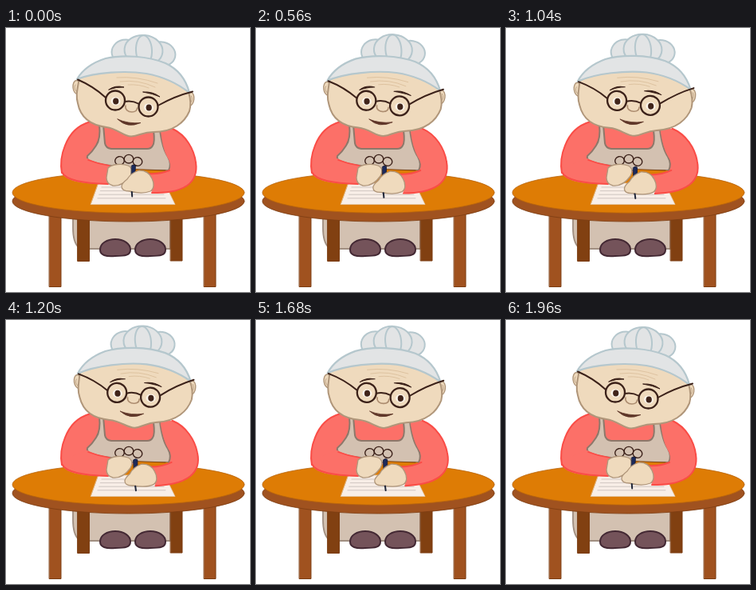
Write an HTML page with a canvas that moves like this. It is 306x330 px and loops after 2 s.

```html
<!DOCTYPE html>
<html lang="en">
<head>
<meta charset="utf-8">
<title>Grandmother writing</title>
<style>
html, body { margin: 0; width: 100%; height: 100%; overflow: hidden; background: #fff; }
canvas { display: block; width: 306px; height: 330px; }
</style>
</head>
<body>
<canvas id="stage"></canvas>
<script>
const canvas = document.getElementById('stage');
const ctx = canvas.getContext('2d');
const ratio = window.devicePixelRatio || 1;
canvas.width = 306 * ratio;
canvas.height = 330 * ratio;

const LOOP = 2000, STEP = 40, PEAK = 1440, REST = 1960;
const SKIN = '#efdabd', SKIN_EDGE = '#b0967a';
const HAIR = '#e2e4e5', HAIR_EDGE = '#b5c7cd';
const CORAL = '#fc7068', CORAL_EDGE = '#fa4c46';
const APRON = '#d3c1b1', APRON_EDGE = '#8d786a';
const WOOD = '#a0521f', WOOD_EDGE = '#7c3d12', WOOD_BACK = '#814011', TOP = '#de7c05';
const DARK = '#3b2119';

function paint(path, fill, stroke, width = 1) {
  if (fill) { ctx.fillStyle = fill; ctx.fill(path); }
  if (stroke) { ctx.strokeStyle = stroke; ctx.lineWidth = width; ctx.stroke(path); }
}

function shape(d, fill, stroke, width) {
  paint(new Path2D(d), fill, stroke, width);
}

function oval(x, y, rx, ry, turn, fill, stroke, width) {
  const path = new Path2D();
  path.ellipse(x, y, rx, ry, turn, 0, Math.PI * 2);
  paint(path, fill, stroke, width);
}

function turned(x, y, angle, draw) {
  ctx.save();
  ctx.translate(x, y);
  ctx.rotate(angle);
  ctx.translate(-x, -y);
  draw();
  ctx.restore();
}

function leg(x, y, bottom, fill) {
  shape(`M${x} ${y}H${x + 14.5}V${bottom}H${x}Z`, fill, WOOD_EDGE);
}

function shoe(x) {
  shape(`M${x} 277C${x} 269 ${x + 9} 264 ${x + 19} 264C${x + 30} 264 ${x + 38} 270 ${x + 38} 277C${x + 38} 284 ${x + 32} 285 ${x + 19} 285C${x + 7} 286 ${x} 284 ${x} 277Z`, '#74535a', '#432833', 2);
}

function lowerPart() {
  shape('M84 232V250Q84 268 91 274Q96 276 106 276H206V232Z', APRON, '#a08e80', 1.8);
  leg(90, 232, 291.5, WOOD_BACK);
  leg(206.5, 232, 291, WOOD_BACK);
  shoe(118);
  shoe(162);
}

function table() {
  leg(54.5, 222, 323.5, WOOD);
  leg(248.5, 222, 323.5, WOOD);
  oval(153.5, 216.5, 145.5, 25.5, 0, WOOD, WOOD_EDGE, 0.8);
  oval(153.5, 205.7, 145.5, 25.5, 0, TOP, '#b6640d', 0.8);
}

function body() {
  shape('M106 117C89 122 80 132 74 147C69 159 68 170 70 181C75 191 90 194 128 195L134 180H204L232 176C231 151 224 136 209 126Z', CORAL);
  shape('M106 117C89 122 80 132 74 147C69 159 68 170 70 181', null, CORAL_EDGE, 2);
  shape('M117 121Q119 138 113 147Q108 155 102 160Q101 164 105 166C111 169 121 171 131 172L145 178H204Q208 170 203 161Q196 151 193 127L185 128Q187 143 184 147Q182 151 177 151H132Q125 150 124 144L122 121Z', APRON, APRON_EDGE, 2);
  oval(142.5, 166, 5.8, 5.3, -0.2, null, DARK, 1.4);
  oval(165, 167, 5.8, 5.3, 0.2, null, DARK, 1.4);
  oval(154, 163.7, 5.8, 5.3, 0, APRON, DARK, 1.4);
  shape('M160 176.5L203 178V182H160Z', TOP);
  shape('M160 176.5L200 178', null, '#7e481a', 1);
}

function paper() {
  shape('M116 194H199L212 220.5H106.5Z', '#f8eee7', '#e3c8a8', 0.8);
  for (let i = 0; i < 4; i++) {
    const y = 199 + i * 4.6;
    shape(`M${120 - i * 1.7} ${y}H${194 + i * 2}`, null, '#c6bbb8', 0.8);
  }
}

function leftArm() {
  shape('M70 181C76 172 88 167 102 163Q116 170 131 172L128 195C100 195 77 193 70 181Z', CORAL);
  shape('M103 165Q116 170 130 172', null, CORAL_EDGE, 1.5);
  shape('M70 180C75 191 98 194 128 195', null, CORAL_EDGE, 2);
  shape('M128 175C133 170 146 169 153 172C159 175 159 180 156 185C151 192 143 198 134 197Q126 195 126 187Z', SKIN, SKIN_EDGE, 1.3);
}

function rightArm() {
  shape('M209 126C226 134 236 152 238 168C240 181 237 190 227 197C215 205 199 206 183 206L178 182Q193 183 205 178Q208 170 202 161Q196 150 194 128Z', CORAL);
  shape('M209 126C226 134 236 152 238 168C240 181 237 190 227 197C215 205 199 206 183 206M178 182Q193 183 205 178', null, CORAL_EDGE, 2);
  shape('M157.5 172Q160 170 162.5 172L160.5 205H157Z', '#1c2a5c', '#151a32', 0.8);
  shape('M145 198C145 195 148 192 152 189C155 184 160 180 167 178C174 178 180 181 183 188C186 194 186 201 181 204C174 207 163 206 155 204C149 204 145 202 145 198Z', SKIN, SKIN_EDGE, 1.3);
  shape('M157.8 205L158.2 210.5', null, '#202638', 2);
}

function hair() {
  oval(149.5, 29.5, 17, 15, -0.2, HAIR, HAIR_EDGE, 2);
  oval(195, 32.5, 17.5, 15, 0.2, HAIR, HAIR_EDGE, 2);
  oval(172.5, 28, 24, 19, 0.1, HAIR, HAIR_EDGE, 2);
  oval(173, 28, 10, 18.7, -0.05, null, HAIR_EDGE, 2);
  shape('M89 64C96 52 109 43 125 38C146 33 178 35 200 44C217 52 226 65 230 81C216 70 198 61 176 57C151 53 112 55 89 64Z', HAIR, HAIR_EDGE, 2.2);
}

function eye(x, y) {
  oval(x, y, 12, 12, 0, SKIN, DARK, 2.3);
  oval(x + 0.5, y + 1, 6, 5, 0.15, '#fbf5ec');
  oval(x + 0.7, y + 1, 3.6, 4, 0, '#40241a');
}

function head() {
  oval(89, 74, 5, 8.5, -0.1, SKIN, SKIN_EDGE, 1.4);
  oval(231, 89, 4.7, 8.5, 0.15, SKIN, SKIN_EDGE, 1.4);
  shape('M87 71Q84.5 75 88 79M232.5 85Q235 90 231 94', null, SKIN_EDGE, 0.8);
  shape('M92 62C90 75 87 84 90 94C93 110 103 121 126 124C140 126 147 135 157 135.5C167 135 171 130 185 130C210 130 224 118 230 104Q233 94 229 80C213 58 180 49 148 49C121 49 103 54 92 62Z', SKIN, SKIN_EDGE, 2);
  hair();
  shape('M139 62Q164 60 190 69M143 67Q166 64 187 74M153 71Q167 70 179 75', null, '#dcc09d', 0.9);
  shape('M129 77Q137 71 148 74Q138 73.5 129 77ZM172 80Q184 79 193 86Q184 82 172 80Z', DARK, DARK, 1);
  shape('M150 97C149 102 153 105 158 105Q164 105 164.5 100', null, '#ad8d70', 1.6);
  eye(137, 90.5);
  eye(178.5, 98.5);
  shape('M125 87Q110 73 90 64.5M190.5 97Q212 85 234 79.5', null, DARK, 2);
  shape('M149 92Q158 90 167 95', null, DARK, 2);
  shape('M140 114Q153 120 169 118.5Q152 126 140 114Z', '#5e3528', '#5e3528', 0.8);
}

// Slow drift along the line of writing, then a quickening return.
function pose(t) {
  const rise = Math.min(1, t / PEAK);
  const fall = Math.min(1, Math.max(0, (t - PEAK) / (REST - PEAK)));
  const back = 1 - fall * fall;
  return { nod: Math.sin(Math.PI / 2 * rise) * back, write: rise * back };
}

function render(now) {
  const t = Math.floor((now % LOOP) / STEP) * STEP;
  const { nod, write } = pose(t);
  ctx.setTransform(ratio, 0, 0, ratio, 0, 0);
  ctx.fillStyle = '#fff';
  ctx.fillRect(0, 0, 306, 330);
  ctx.lineCap = ctx.lineJoin = 'round';
  lowerPart();
  table();
  body();
  paper();
  leftArm();
  turned(205, 135, -0.074 * write, rightArm);
  turned(145, 48, -0.054 * nod, head);
}

let start;
function tick(now) {
  if (start === undefined) start = now;
  render(now - start);
  requestAnimationFrame(tick);
}
render(0);
requestAnimationFrame(tick);
</script>
</body>
</html>
```
